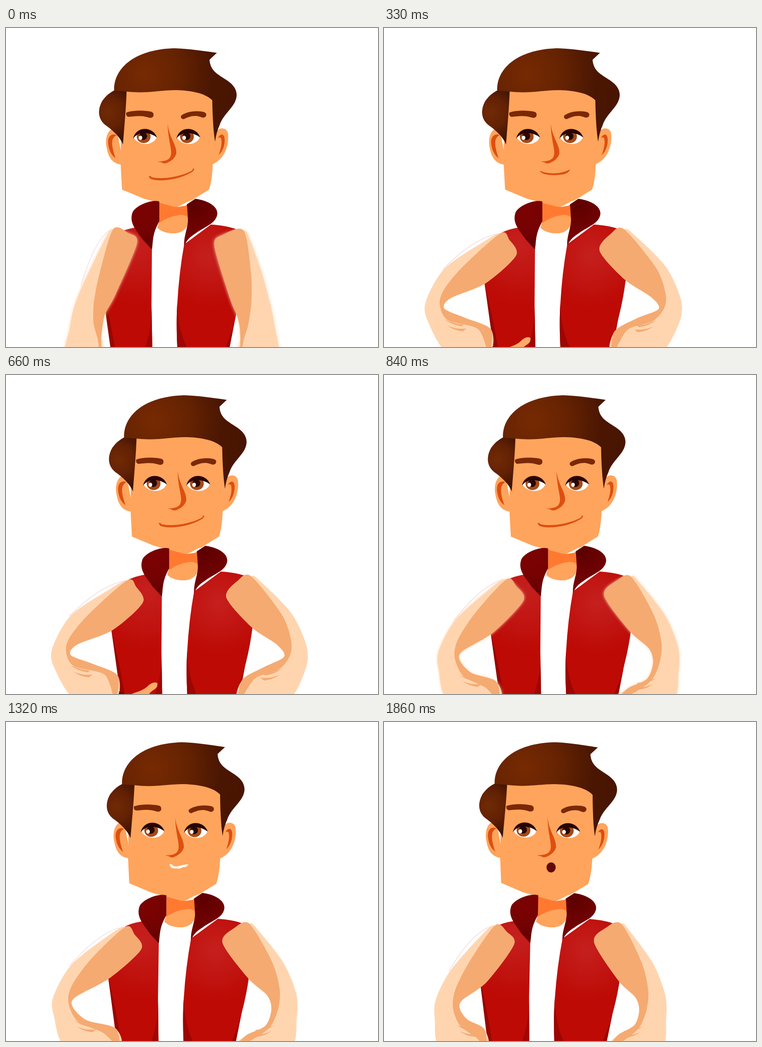
Write an HTML page with a canvas that moves like this. It is 808 px wide and 693 px high and loops after 1890 ms.

```html
<!DOCTYPE html>
<html lang="en">
<head>
<meta charset="utf-8">
<title>Man with a red vest</title>
<style>
html, body { margin: 0; width: 100%; height: 100%; overflow: hidden; background: #fff; }
canvas { display: block; }
</style>
</head>
<body>
<canvas id="stage" width="808" height="693"></canvas>
<script>
const ctx = document.getElementById('stage').getContext('2d');
const LOOP = 1890, STEP = 30;
const SKIN = '#ffa45c', LINE = '#dd4f10', LIGHT = '#ffd5b0', TAN = '#f5aa71';

// [time, value] tracks, linear between keys
const shift = [[0, 0], [510, 17], [690, 22.5], [840, 23.5], [1000, 23], [1620, 8.3], [1890, 1]];
const tilt = [[0, 0], [900, 0], [1620, .011], [1890, .014]];
const leftBend = [[0, 0], [90, .75], [180, 1.2], [480, 2], [590, 2], [840, .86], [1200, 1], [1320, 1], [1890, .58]];
const rightBend = [[0, 0], [90, .9], [180, 1.65], [480, 2], [590, 2], [840, 1], [1320, 1], [1890, .84]];
const haze = [[0, 7], [150, 0], [700, 0], [840, 6], [980, 0], [1890, 0]];

function mouthAt(t) {
  if (t >= 1740) return 'round';
  if (t >= 1080 && t < 1470) return 'teeth';
  return t >= 330 && t < 660 ? 'small' : 'smile';
}

function at(track, t) {
  let i = 1;
  while (i < track.length - 1 && track[i][0] < t) i++;
  const [t0, a] = track[i - 1], [t1, b] = track[i];
  return a + (b - a) * (t - t0) / (t1 - t0);
}

// Arm hanging, bent, and with the hand on the hip: 14 outline points, then 5 along the shade edge
const leftArm = [
  [233,437, 216,457, 167,558, 147,610, 138,655, 130,715, 206,715, 207,670, 210,645, 213,628, 219,613, 238,578, 284,468, 266,446,
   204,530, 191,595, 190,640, 199,675, 203,700],
  [244,445, 214,459, 127,527, 87,598, 89,640, 115,705, 229,705, 222,665, 160,648, 130,620, 135,598, 210,556, 278,494, 264,462,
   172,512, 129,570, 120,608, 140,650, 195,675],
  [240,447, 201,467, 116,520, 75,592, 81,635, 135,705, 208,705, 221,648, 170,618, 114,603, 132,580, 210,553, 274,495, 260,460,
   150,525, 110,572, 104,600, 120,625, 192,640]
];
const rightArm = [
  [516,440, 529,458, 555,530, 574,600, 583,645, 589,715, 509,715, 509,675, 508,652, 505,636, 500,620, 487,588, 453,474, 470,450,
   532,530, 533,595, 526,645, 517,675, 512,700],
  [513,438, 526,445, 586,521, 615,590, 616,645, 600,710, 480,710, 506,681, 548,660, 561,625, 552,594, 511,557, 455,480, 480,448,
   562,520, 579,580, 576,622, 560,660, 530,684],
  [510,437, 527,444, 603,516, 638,590, 633,640, 582,710, 486,710, 486,655, 535,625, 591,607, 572,582, 513,545, 458,485, 482,447,
   583,520, 605,575, 602,606, 575,632, 515,650]
];

function pose(list, u) {
  const i = Math.min(1, Math.floor(u)), k = u - i, pts = [];
  const mix = n => list[i][n] * (1 - k) + list[i + 1][n] * k;
  for (let j = 0; j < list[i].length; j += 2) pts.push([mix(j), mix(j + 1)]);
  return pts;
}

function smooth(pts) {
  const n = pts.length, p = new Path2D();
  p.moveTo(...pts[0]);
  for (let i = 0; i < n; i++) {
    const a = pts[(i + n - 1) % n], b = pts[i], c = pts[(i + 1) % n], d = pts[(i + 2) % n];
    p.bezierCurveTo(b[0] + (c[0] - a[0]) / 7, b[1] + (c[1] - a[1]) / 7,
      c[0] - (d[0] - b[0]) / 7, c[1] - (d[1] - b[1]) / 7, c[0], c[1]);
  }
  return p;
}

function fill(path, color) {
  ctx.fillStyle = color;
  ctx.fill(typeof path === 'string' ? new Path2D(path) : path);
}

function oval(x, y, rx, ry, color) {
  ctx.beginPath();
  ctx.ellipse(x, y, rx, ry, 0, 0, 7);
  ctx.fillStyle = color;
  ctx.fill();
}

function glow(x, y, r, ...colors) {
  const g = ctx.createRadialGradient(x, y, 0, x, y, r);
  colors.forEach((c, i) => g.addColorStop(i / (colors.length - 1), c));
  return g;
}

function drawVest() {
  fill('M300 431 Q262 435 244 445 L214 500 L207 552 L230 693 L229 710 L318 710 L316 600 L317 478Z',
    glow(285, 470, 130, '#c5201e', '#bd0a05'));
  fill('M445 427 Q480 429 502 438 L522 500 L514 548 L486 693 L482 710 L373 710 Q369 645 372 600 Q376 530 387 470Z',
    glow(440, 495, 110, '#c5201e', '#bd0a05'));
  fill('M207 552 Q225 625 239 710 L229 710Z', '#980603');
  fill('M514 548 Q502 640 470 710 L482 710Z', '#980603');
  fill('M316 600 Q318 660 296 710 L318 710Z', '#a00603');
  fill('M372 600 Q374 668 402 710 L373 710 Q369 645 372 600Z', '#9c0603');
}

function drawNeck() {
  fill('M333 374 L395 374 L396 422 Q390 446 362 446 Q340 445 329 434 L333 420Z', '#ff7a30');
  fill('M331 425 Q350 410 378 406 Q390 405 395 412 L396 422 Q390 446 362 446 Q340 445 329 434Z', SKIN);
}

function drawCollar() {
  fill('M333 377 C318 372 284 384 275 400 C266 424 284 440 298 461 L317 481 C320 463 317 448 333 420Z',
    glow(300, 400, 85, '#7b0302', '#750202', '#5a0000'));
  fill('M411 371 C442 375 460 389 459 404 C456 425 434 430 412 446 C396 456 391 464 387 474 C385 452 397 432 395 412 L393 383Z',
    glow(410, 385, 90, '#5d0000', '#6e0202', '#7b0505'));
}

function drawEye(x, slant) {
  ctx.save();
  ctx.translate(x, 238);
  const white = new Path2D('M-24 0 C-14 -23 18 -22 26 0 C18 18 -12 19 -24 0Z');
  fill(white, '#fff');
  ctx.save();
  ctx.clip(white);
  oval(-2, -2, 15, 14, '#a54a18');
  oval(-3, -3, 8.5, 8.5, '#2a0704');
  ctx.restore();
  oval(slant - 9, .5, 4, 4.5, '#fff');
  fill('M-25 3 C-20 -25 18 -26 27 0 C14 -11 -14 -16 -25 3Z', '#290303');
  ctx.restore();
}

function drawMouth(kind) {
  if (kind === 'smile') fill('M310 322 Q314 320 316 324 C340 330 382 323 405 309 L406 305 L409 306 Q408 312 400 315 C372 331 328 335 313 327Z', LINE);
  if (kind === 'small') fill('M327 310 C345 318 374 318 393 307 Q392 313 382 317 C360 322 331 320 327 310Z', LINE);
  if (kind === 'teeth') fill('M339 309 Q344 308 348 313 C358 316 368 309 380 309 Q377 316 369 315 Q362 320 354 318 Q341 320 339 309Z', '#fff');
  if (kind === 'round') oval(360, 316, 10, 11, '#620a0a');
}

function drawHead(mouth) {
  fill('M240 217 C220 217 214 240 219 262 C223 285 235 297 255 297Z', SKIN);
  fill('M452 232 C460 214 478 214 482 228 C485 248 479 286 444 298Z', SKIN);
  fill('M240 233 C228 227 220 238 222 252 C224 268 230 277 238 283 C233 268 228 252 232 241 Q235 235 240 233Z', LINE);
  fill('M460 239 C467 227 475 230 475 243 C475 259 469 269 462 276 C467 262 470 249 467 239 Q464 236 460 239Z', LINE);
  fill('M250 130 L450 130 L453 245 L449 296 Q448 330 441 351 L394 380 Q378 391 364 388 L300 371 L252 351 L249 296Z', SKIN);
  fill('M372 389 L397 376 L405 374 L390 386Z', '#fff');

  fill('M262 136 C261 170 257 215 254 253 C248 237 232 222 216 211 C197 196 200 173 210 157 Q220 143 236 135Z',
    glow(222, 184, 65, '#702a05', '#632104', '#3d1102'));
  fill('M235 136 C233 90 276 47 364 44 Q392 44 458 54 L442 69 C444 93 459 100 479 113 C496 124 501 135 501 146 C500 171 473 184 464 211 Q457 226 454 247 Q449 215 448 157 C432 140 395 135 366 135 C335 135 305 143 261 138Z',
    glow(300, 100, 225, '#772a02', '#662302', '#4a1602', '#481502'));

  fill('M261 184 C277 178 303 179 316 182 Q322 184 320 192 Q316 197 308 194 C292 189 278 192 266 193 Q260 192 261 184Z', '#7a2806');
  fill('M380 191 C389 182 414 178 431 183 Q437 186 434 192 Q430 197 422 193 C409 188 396 193 386 198 Q379 198 380 191Z', '#7a2806');
  drawEye(301, 0);
  drawEye(395, 1);
  fill('M351 208 C355 240 371 253 370 273 Q366 286 350 293 Q342 296 338 292 L329 290 Q347 290 354 284 C366 272 352 252 351 208Z', LINE);
  drawMouth(mouth);
}

function drawHands(u) {
  ctx.save();
  ctx.translate(0, (2 - u) * 48);
  fill('M217 666 L242 681 L240 760 L200 760Z', '#760509');
  fill('M241 682 C256 674 277 672 289 658 Q300 650 307 654 Q309 663 299 669 Q286 677 290 684 L299 700 L299 760 L241 760Z', '#ffab68');
  fill('M419 694 Q426 684 434 693 L440 760 L419 760Z', '#ffab68');
  ctx.restore();
}

function drawArm(arm, u, soft) {
  const p = pose(arm, u), edge = p.slice(14), left = arm === leftArm;
  if (left) {
    const [a, b, c] = p;
    ctx.beginPath();
    ctx.moveTo(c[0] - 4, c[1] + 2);
    ctx.quadraticCurveTo(b[0] - 20, b[1] - 10, a[0], a[1]);
    ctx.fillStyle = '#fff';
    ctx.fill();
    ctx.strokeStyle = '#efd5d8';
    ctx.lineWidth = 1.2;
    ctx.stroke();
  }
  ctx.save();
  ctx.shadowColor = LIGHT;
  ctx.shadowBlur = soft;
  fill(smooth(p.slice(0, 14)), LIGHT);
  ctx.restore();
  fill(smooth([p[0], ...edge, ...p.slice(6, 14)]), TAN);

  // creases below the elbow
  if (u > .5) {
    ctx.save();
    ctx.translate(...edge[3]);
    ctx.scale(left ? 1 : -1, 1);
    fill('M-8 -2 Q14 8 34 9 L30 13 Q8 10 -8 -2Z M-2 11 Q15 20 40 18 L32 24 Q12 22 -2 11Z', TAN);
    ctx.restore();
  }
}

function draw(now) {
  const t = Math.floor(now % LOOP / STEP) * STEP;
  const dx = at(shift, t), u = at(leftBend, t), v = at(rightBend, t), soft = at(haze, t);
  ctx.fillStyle = '#fff';
  ctx.fillRect(0, 0, 808, 693);

  ctx.save();
  ctx.translate(365 + dx, 400);
  ctx.rotate(at(tilt, t));
  ctx.translate(-365, -400);
  drawVest();
  drawNeck();
  drawHead(mouthAt(t));
  drawCollar();
  ctx.restore();

  ctx.save();
  ctx.translate(dx, 0);
  drawHands(u);
  drawArm(leftArm, u, soft);
  drawArm(rightArm, v, soft);
  ctx.restore();
  requestAnimationFrame(draw);
}
requestAnimationFrame(draw);
</script>
</body>
</html>
```
